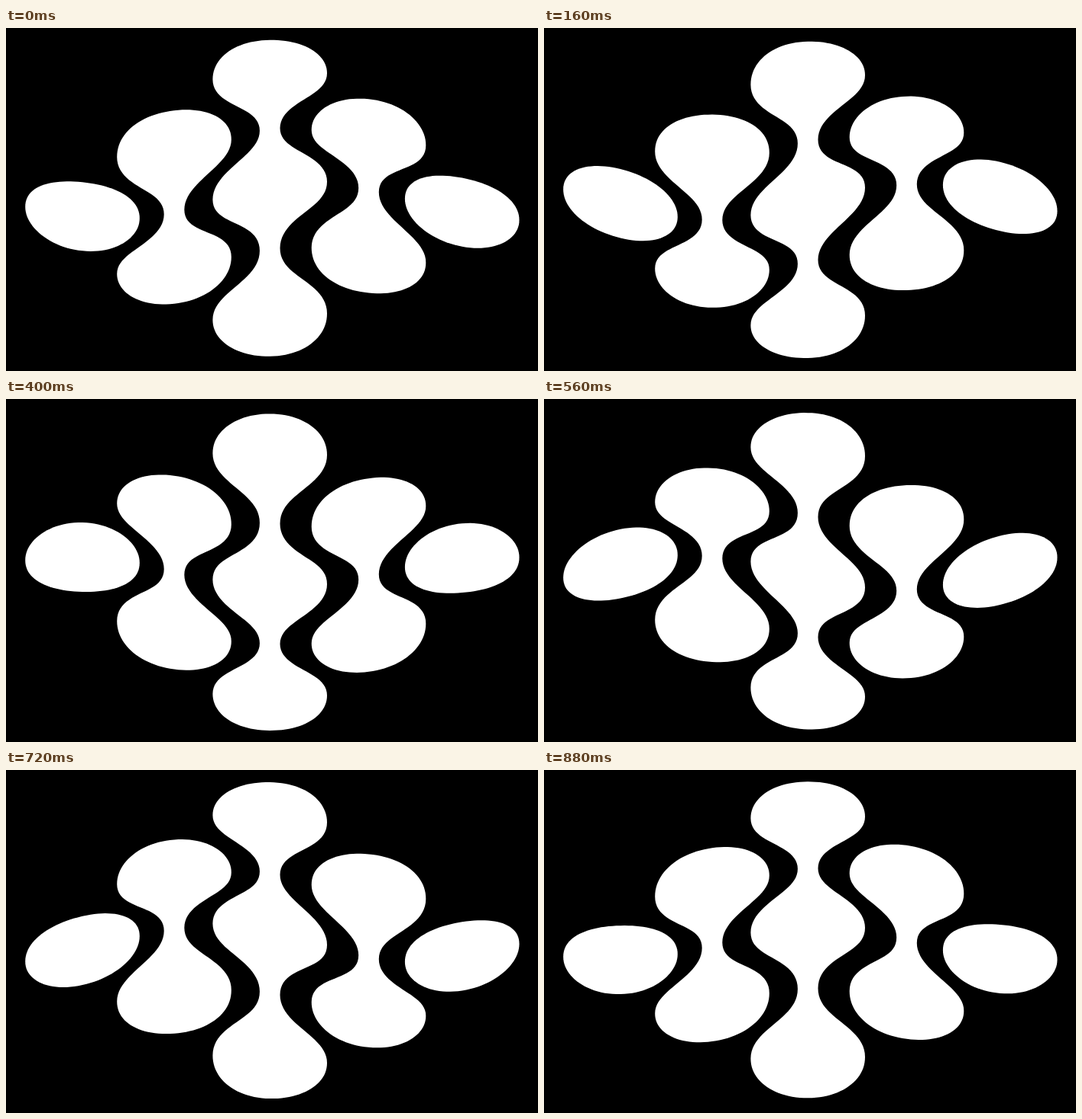
Write an HTML page with a canvas that moves like this. It is 696 px wide and 450 px high and loops after 960 ms.

```html
<!DOCTYPE html>
<html lang="en">
<head>
<meta charset="utf-8">
<title>Wobbling blobs</title>
<style>
  html, body { margin: 0; width: 100%; height: 100%; overflow: hidden; background: #000; }
  canvas { display: block; }
</style>
</head>
<body>
<canvas id="stage" width="696" height="450"></canvas>
<script>
const ctx = document.getElementById('stage').getContext('2d');
const LOOP = 960, STEPS = 12, SAMPLES = 24;
const LOBE = 74.8, NECK = 13.3, PULL = 0.47, ROUND = 0.96;

// Each column: centre x, widest points of its lobes, height of the end caps
const columns = [
  { x: 100, lobes: [228.3], cap: 45.2 },
  { x: 220, lobes: [151.5, 305.3], cap: 50 },
  { x: 345.2, lobes: [67.3, 225, 382.7], cap: 49.9 },
  { x: 474.5, lobes: [151.5, 305.3], cap: 50 },
  { x: 596.7, lobes: [228.3], cap: 45.2 }
];

// S-shaped side from (w0, y0) to (w1, y1), vertical at both ends
function addSide(points, w0, y0, w1, y1) {
  for (let i = 1; i <= SAMPLES; i++) {
    const s = i / SAMPLES, r = 1 - s;
    const across = s * s * (3 - 2 * s);
    const down = 3 * PULL * s * r * r + 3 * (1 - PULL) * s * s * r + s ** 3;
    points.push([w0 + (w1 - w0) * across, y0 + (y1 - y0) * down]);
  }
}

// Quarter of a slightly squared ellipse
function addCap(points, y, height, from) {
  const bulge = v => Math.sign(v) * Math.abs(v) ** ROUND;
  for (let i = 0; i <= SAMPLES; i++) {
    const a = from + i / SAMPLES * Math.PI / 2;
    points.push([LOBE * bulge(Math.cos(a)), y + height * bulge(Math.sin(a))]);
  }
}

function outline({ x, lobes, cap }) {
  const side = [];
  addCap(side, lobes[0], cap, -Math.PI / 2);
  for (let i = 1; i < lobes.length; i++) {
    const neckY = (lobes[i - 1] + lobes[i]) / 2;
    addSide(side, LOBE, lobes[i - 1], NECK, neckY);
    addSide(side, NECK, neckY, LOBE, lobes[i]);
  }
  addCap(side, lobes[lobes.length - 1], cap, 0);
  const right = side.map(([w, y]) => [x + w, y]);
  const left = side.map(([w, y]) => [x - w, y]).reverse();
  return right.concat(left);
}

const shapes = columns.map(outline);

// Wave running to the right, strongest at mid height
function lift(x, y, t) {
  const strength = 27.9 - 0.122 * Math.hypot(y - 226, 35);
  return strength * Math.cos(2 * Math.PI * (t - x / 535 + 0.255));
}

function draw(now) {
  const t = Math.floor(now % LOOP / LOOP * STEPS) / STEPS;
  ctx.fillStyle = '#000';
  ctx.fillRect(0, 0, 696, 450);
  ctx.fillStyle = '#fff';
  for (const shape of shapes) {
    ctx.beginPath();
    for (const [x, y] of shape) ctx.lineTo(x, y + lift(x, y, t));
    ctx.fill();
  }
}

const start = performance.now();
function tick() {
  draw(performance.now() - start);
  requestAnimationFrame(tick);
}
tick();
</script>
</body>
</html>
```
